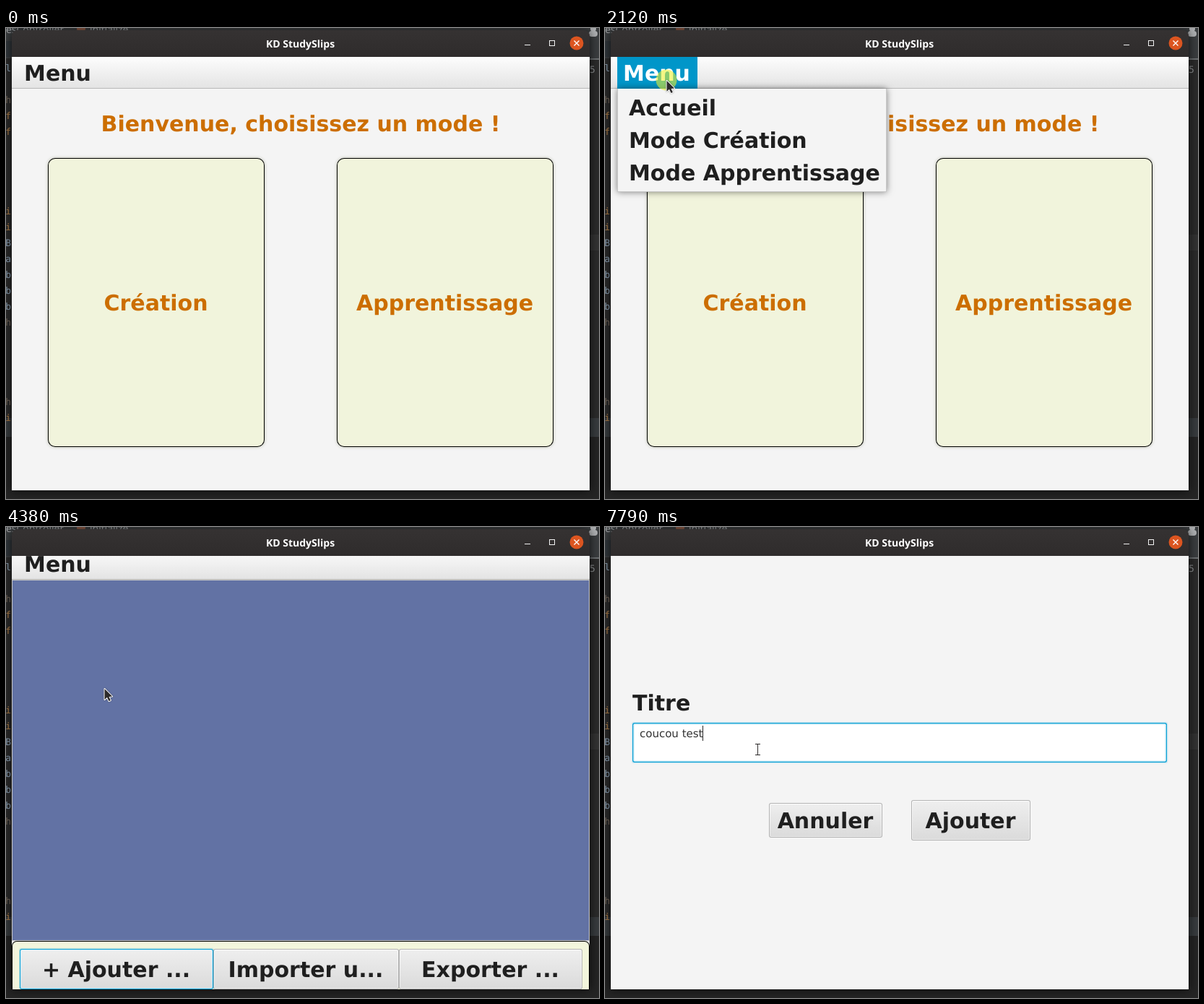
These frames come from a looping animation (821 by 652 pixels, 8000 ms). An HTML page with a canvas:

```html
<!DOCTYPE html>
<html lang="fr">
<head>
<meta charset="utf-8">
<title>KD StudySlips</title>
<style>
html, body { margin: 0; width: 100%; height: 100%; overflow: hidden; background: #262626; }
canvas { display: block; }
</style>
</head>
<body>
<canvas id="stage" width="821" height="652"></canvas>
<script>
const ctx = document.getElementById('stage').getContext('2d');
const LOOP = 8000, TICK = 1000 / 15, PHASE = 45;
const BOLD = 'bold 30px "DejaVu Sans", sans-serif';
const BODY = '15px "DejaVu Sans", sans-serif';
const CODE = '13px "DejaVu Sans Mono", monospace';
const CHROME = '14px "Open Sans", sans-serif';
const INK = '#1f1f1f', ORANGE = '#cc6e00', BLUE = '#039ed3', PAPER = '#f4f4f4';

// Ticks (15 per second) at which the interface changes
const AT = { cursor: 5, open: 19, close: 32, create: 47, form: 77, type: 100, word2: 108 };
const CLICKS = [18, 31, 45, 76];

// Each sweep of the pointer is a quadratic curve that starts where the last one ended
const HOME = { x: 484, y: 406 };
const SWEEPS = [
  { from: 5, to: 17, via: [85, 72], end: [85, 72] },
  { from: 32, to: 42, via: [187, 214], end: [232, 275] },
  { from: 50, to: 60, via: [230, 170], end: [84, 60] },
  { from: 62, to: 75, via: [207, 438], end: [238, 600] },
  { from: 76, to: 89, via: [233, 370], end: [211, 308] }
];

function pointer(n) {
  let { x, y } = HOME;
  for (const { from, to, via, end } of SWEEPS) {
    if (n <= from) break;
    const u = Math.min(1, (n - from) / (to - from)), v = 1 - u;
    x = v * v * x + 2 * u * v * via[0] + u * u * end[0];
    y = v * v * y + 2 * u * v * via[1] + u * u * end[1];
  }
  return { x: Math.round(x), y: Math.round(y) };
}

const inside = (p, x, y, w, h) => p.x >= x && p.x < x + w && p.y >= y && p.y < y + h;

function rect(x, y, w, h, fill) {
  ctx.fillStyle = fill;
  ctx.fillRect(x, y, w, h);
}

function round(x, y, w, h, r, fill) {
  ctx.beginPath();
  ctx.roundRect(x, y, w, h, r);
  ctx.fillStyle = fill;
  ctx.fill();
}

function disc(x, y, r, fill) {
  ctx.beginPath();
  ctx.arc(x, y, r, 0, 7);
  ctx.fillStyle = fill;
  ctx.fill();
}

function text(s, x, y, font, fill, align = 'center') {
  ctx.font = font;
  ctx.fillStyle = fill;
  ctx.textAlign = align;
  ctx.fillText(s, x, y);
}

function fade(y, h, from, to) {
  const g = ctx.createLinearGradient(0, y, 0, y + h);
  g.addColorStop(0, from);
  g.addColorStop(1, to);
  return g;
}

function shadow(color, blur, draw) {
  ctx.save();
  ctx.shadowColor = color;
  ctx.shadowBlur = blur;
  draw();
  ctx.restore();
}

function editor() {
  rect(0, 0, 821, 652, '#2a2a2a');
  rect(0, 0, 821, 42, '#3a3d3f');
  rect(0, 18, 8, 22, '#30363b');
  rect(808, 42, 13, 2, '#6c7072');
  rect(808, 286, 13, 22, '#323232');
  rect(0, 540, 821, 26, '#373b3e');
  rect(0, 566, 821, 86, '#242424');
  text('esController', 0, 7, CHROME, '#a5a8aa', 'left');
  text('initialize', 116, 7, CHROME, '#a5a8aa', 'left');
  disc(104, 1, 6, '#8d5a45');
  disc(813, 1, 4, '#aeb0b2');
  round(807, 4, 12, 8, 4, '#aeb0b2');
  // Last letters of the code lines that stick out on the left
  [...'l hff    iiBabbbh    hi'].forEach((c, i) => {
    const color = 'lBab'.includes(c) ? '#8fa5ba' : c === 'h' ? '#77695c' : '#b5824a';
    text(c, 7, 60 + 22 * i, CODE, color, 'right');
  });
  text('5', 808, 62, CODE, '#8b8e90', 'left');
}

function frame() {
  shadow('rgba(0,0,0,.75)', 14, () => round(8, 4, 800, 636, [8, 8, 0, 0], '#2e2b2b'));
  round(8, 3, 800, 37, [8, 8, 0, 0], fade(3, 37, '#353232', '#2f2c2c'));
  text('KD StudySlips', 407.5, 27, 'bold 14px "Noto Sans", sans-serif', '#fff');
  rect(718, 23, 8, 1, '#f2f2f2');
  ctx.strokeStyle = '#f2f2f2';
  ctx.lineWidth = 1;
  ctx.strokeRect(752.5, 17.5, 7, 7);
  disc(790, 21, 9.5, '#dc5520');
  ctx.beginPath();
  ctx.moveTo(786.5, 17.5); ctx.lineTo(793.5, 24.5);
  ctx.moveTo(793.5, 17.5); ctx.lineTo(786.5, 24.5);
  ctx.strokeStyle = '#fff';
  ctx.lineWidth = 1.4;
  ctx.stroke();
  rect(8, 40, 800, 600, PAPER);
}

function menuBar(top, active) {
  rect(8, top, 800, 44, fade(top, 44, '#fdfdfd', '#e3e3e3'));
  rect(8, top + 43, 800, 1, '#b8b8b8');
  if (active) rect(17, top, 111, 44, '#0096c9');
  text('Menu', 71.5, top + 33, BOLD, active ? '#fff' : INK);
}

function card(x, label, hover) {
  shadow(hover ? 'rgba(0,0,0,.4)' : 'rgba(60,70,20,.35)', hover ? 6 : 4,
    () => round(x, 180, 300, 400, 10, '#000'));
  round(x + 1, 181, 298, 398, 9, hover ? '#fcd504' : '#f1f4dc');
  text(label, x + 149.5, 391, BOLD, ORANGE);
}

function button(x, y, w, h, label, { hover, focus } = {}) {
  const layer = (d, r, fill) => round(x + d, y + d, w - 2 * d, h - 2 * d, r, fill);
  const body = hover ? fade(y, h, '#f8f8f8', '#e6e6e6') : fade(y, h, '#efefef', '#dadada');
  layer(0, 3, focus ? BLUE : '#b2b2b2');
  layer(1, 2, fade(y, h, '#fdfdfd', '#ebebeb'));
  if (focus) layer(-1.4, 4, 'rgba(3,158,211,.13)');
  layer(focus ? 2.6 : 2, 1, body);
  text(label, x + w / 2 - 0.5, y + h / 2 + 11, BOLD, INK);
}

function popup() {
  shadow('rgba(0,0,0,.5)', 9, () => rect(17, 84, 373, 143, '#c8c8c8'));
  rect(18, 84, 371, 142, PAPER);
  ['Accueil', 'Mode Création', 'Mode Apprentissage'].forEach((s, i) =>
    text(s, 33, 121 + i * 45, BOLD, INK, 'left'));
}

function home(n, p) {
  const open = n >= AT.open && n < AT.close;
  const over = (...box) => n >= AT.cursor && !open && inside(p, ...box);
  menuBar(40, open || over(17, 40, 111, 44));
  text('Bienvenue, choisissez un mode !', 408, 143, BOLD, ORANGE);
  card(58, 'Création', over(58, 180, 300, 400));
  card(458, 'Apprentissage', over(458, 180, 300, 400));
  if (open) popup();
}

function create(p) {
  ctx.save();
  ctx.beginPath();
  ctx.rect(8, 40, 800, 600);
  ctx.clip();
  menuBar(29, inside(p, 17, 40, 111, 33));
  rect(8, 73, 800, 500, '#c8c8c8');
  rect(9, 74, 798, 498, '#6272a4');
  rect(8, 573, 800, 67, PAPER);
  round(8, 573, 800, 90, 7, '#000');
  round(9, 574, 798, 90, 6, '#f2f5dc');
  button(287, 584, 257, 56, 'Importer u...');
  button(544, 584, 254, 56, 'Exporter ...');
  button(19, 584, 268, 56, '+ Ajouter ...', { focus: true, hover: inside(p, 19, 584, 268, 56) });
  ctx.restore();
}

// One letter per tick for the first word, then one every other tick
function typed(n) {
  const count = n < AT.word2
    ? Math.min(6, Math.max(0, n - AT.type + 1))
    : 7 + Math.floor((n - AT.word2) / 2);
  return 'coucou test'.slice(0, count);
}

function form(n, p) {
  text('Titre', 38, 254, BOLD, INK, 'left');
  round(36.6, 269.6, 742.8, 57.8, 4, 'rgba(3,158,211,.13)');
  round(38, 271, 740, 55, 3, BLUE);
  round(39.2, 272.2, 737.6, 52.6, 2, '#dff2f9');
  round(41, 274, 734, 49, 1, '#fff');

  const s = typed(n);
  text(s, 48, 291, BODY, '#333', 'left');
  const lit = Math.floor((n - AT.form + 2) / 7) % 2 === 0;
  if (lit || n >= AT.type) rect(47.5 + ctx.measureText(s).width, 275, 1, 21, '#222');

  // Passing over the first button shrinks its padding for good
  const slim = p.y < 434;
  if (slim) button(227, 382, 157, 48, 'Annuler', { hover: inside(p, 227, 382, 157, 48) });
  else button(219, 378, 173, 56, 'Annuler');
  button(slim ? 424 : 432, 378, 165, 56, 'Ajouter');
}

function arrow({ x, y }) {
  ctx.save();
  ctx.translate(x + 0.5, y + 1);
  ctx.beginPath();
  ctx.moveTo(0, 0);
  for (const [dx, dy] of [[0, 15], [3.4, 11.8], [6, 17], [8.4, 16], [6, 10.9], [10.6, 10.6]])
    ctx.lineTo(dx, dy);
  ctx.closePath();
  ctx.lineJoin = 'round';
  ctx.strokeStyle = '#fff';
  ctx.lineWidth = 2;
  shadow('rgba(0,0,0,.4)', 2, () => ctx.stroke());
  ctx.fillStyle = '#2d2b2b';
  ctx.fill();
  ctx.restore();
}

function ibeam({ x, y }) {
  const draw = (color, e) => {
    rect(x - e, y - 7 - e, 1 + 2 * e, 14 + 2 * e, color);
    rect(x - 3 - e, y - 8 - e, 7 + 2 * e, 1 + 2 * e, color);
    rect(x - 3 - e, y + 7 - e, 7 + 2 * e, 1 + 2 * e, color);
  };
  draw('#fff', 1);
  draw('#2d2b2b', 0);
}

function draw(t) {
  const n = Math.floor((t - PHASE) / TICK);
  const p = pointer(n);
  editor();
  frame();
  if (n < AT.create) home(n, p);
  else if (n < AT.form) create(p);
  else form(n, p);
  if (CLICKS.includes(n)) disc(p.x, p.y, 14.5, 'rgba(235,240,45,.58)');
  if (n >= AT.form && inside(p, 38, 271, 740, 55)) ibeam(p);
  else if (n >= AT.cursor) arrow(p);
}

// Unhinted letter widths, as in the desktop toolkit
ctx.textRendering = 'geometricPrecision';
ctx.fontKerning = 'none';
const start = performance.now();
function tick() {
  draw((performance.now() - start) % LOOP);
  requestAnimationFrame(tick);
}
tick();
</script>
</body>
</html>
```
